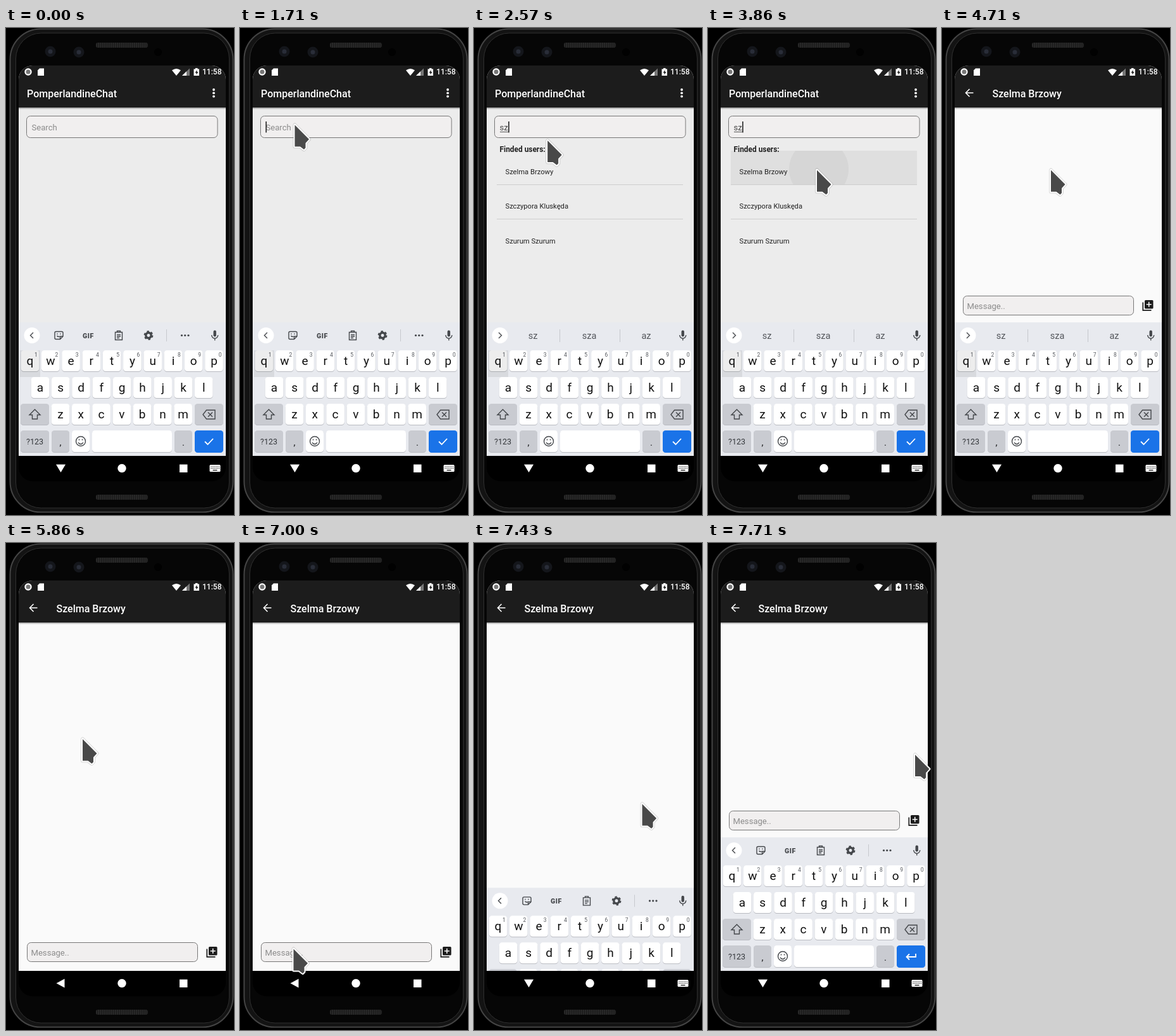
Recreate the animation shown at these times as an HTML page. Size 360 by 766 pixels, loop 8 s.

```html
<!DOCTYPE html>
<html lang="en">
<head>
<meta charset="utf-8">
<title>Chat search</title>
<style>
html, body { margin: 0; height: 100%; overflow: hidden; background: #000; }
svg { display: block; width: 100vw; height: 100vh; font-family: Roboto, sans-serif; }
.line { fill: none; stroke: #44474b; stroke-width: 1.4; }
.title { font-size: 16px; font-weight: 500; fill: #fff; }
.input { font-size: 13.1px; fill: #8b8b8b; }
.box { fill: #f1efef; stroke: #777; }
.row { font-size: 11.2px; fill: #222; }
.mid { text-anchor: middle; }
</style>
</head>
<body>
<svg viewBox="0 0 360 766">
  <defs>
    <clipPath id="screen"><path d="M20 673V81a22 22 0 0 1 22-22H325a22 22 0 0 1 22 22V673Z"/></clipPath>
    <clipPath id="firstRow"><path d="M36 193H330V247H36Z"/></clipPath>
    <linearGradient id="shade" x2="0" y2="1">
      <stop stop-color="#000" stop-opacity=".4"/><stop offset="1" stop-color="#000" stop-opacity="0"/>
    </linearGradient>
    <pattern id="mesh" width="3" height="7" patternUnits="userSpaceOnUse">
      <path fill="#292929" d="M0 0h3v7H0z"/><path fill="#161616" d="M0 0h1v7H0z"/>
    </pattern>
  </defs>

  <g id="phone">
    <rect x="6.5" y="1.5" width="352" height="760" rx="48" fill="#131313" stroke="#444" stroke-width="2"/>
    <rect x="15.5" y="8" width="337" height="747" rx="40" fill="#060606" stroke="#303030"/>
    <rect x="142" y="23" width="82" height="8" rx="3" fill="url(#mesh)"/>
    <rect x="142" y="734" width="82" height="8" rx="3" fill="url(#mesh)"/>
    <g fill="#14161b"><circle cx="70" cy="37" r="8.5"/><circle cx="115" cy="38" r="8.5"/></g>
    <g fill="#292d38"><circle cx="70" cy="37" r="3.5"/><circle cx="115" cy="38" r="3.5"/></g>
    <circle cx="240" cy="38" r="6" fill="#010101"/>
  </g>

  <g clip-path="url(#screen)">
    <rect x="20" y="59" width="327" height="614" fill="#ececec"/>
    <rect x="20" y="59" width="327" height="66" fill="#1c1c1c"/>
    <rect x="20" y="125" width="327" height="3" fill="url(#shade)"/>
    <text class="title" x="33" y="108.5">PomperlandineChat</text>
    <g fill="#fff"><circle cx="328" cy="97" r="1.9"/><circle cx="328" cy="102.3" r="1.9"/><circle cx="328" cy="107.6" r="1.9"/></g>
    <rect class="box" x="32.5" y="138.5" width="301.5" height="34" rx="6"/>
    <text class="input" id="query" x="40.5" y="160.5"></text>
    <path id="underline" stroke="#555"/>
    <path id="caret" d="M0 147V164.5" stroke="#222" stroke-width="1.6"/>

    <g id="results">
      <g id="press" clip-path="url(#firstRow)">
        <path fill="#dfdfdf" d="M36 193H330V247H36Z"/>
        <circle id="ripple" cx="175" cy="222" fill="#d6d6d6"/>
      </g>
      <text x="40.5" y="195" font-size="11.9" font-weight="700" fill="#222">Finded users:</text>
      <text class="row" x="49.5" y="230">Szelma Brzowy</text>
      <text class="row" x="49.5" y="284">Szczypora Kluskęda</text>
      <text class="row" x="49.5" y="338.5">Szurum Szurum</text>
      <path d="M36 246.5H330M36 300.5H330" stroke="#cecece"/>
    </g>

    <g id="chat">
      <rect x="20" y="82" width="327" height="600" fill="#fafafa"/>
      <rect x="20" y="82" width="327" height="43" fill="#1c1c1c"/>
      <rect x="20" y="125" width="327" height="3" fill="url(#shade)"/>
      <path d="M49.5 102H38M43.5 96L37.5 102L43.5 108" fill="none" stroke="#fff" stroke-width="1.6"/>
      <text class="title" x="79.5" y="108.5">Szelma Brzowy</text>
      <g id="message">
        <rect class="box" x="33.5" y="421.5" width="269" height="30" rx="6"/>
        <text class="input" x="39.5" y="441.5">Message..</text>
        <path id="messageCaret" d="M40.5 427.5V446.5" stroke="#222" stroke-width="1.6"/>
        <rect x="320" y="428" width="13.5" height="13.5" rx="1.5" fill="#1c1c1c"/>
        <path d="M326.700 430.700V438.700M322.700 434.700H330.700" stroke="#fafafa" stroke-width="1.6"/>
        <path d="M317.300 431.500V444.200H330.500" fill="none" stroke="#1c1c1c" stroke-width="1.7"/>
      </g>
    </g>

    <g id="keyboard">
      <rect x="20" y="463" width="327" height="210" fill="#e8eaef"/>
      <circle cx="41" cy="483.5" r="12.5" fill="#fff"/>
      <path class="line" d="M324.700 483a5 5.200 0 0 0 10 0M329.700 488V491.500"/>
      <rect x="327.500" y="475.500" width="4.400" height="10" rx="2.200" fill="#44474b"/>
      <g id="tools">
        <g class="line">
          <path d="M43 479L38.5 483.5L43 488"/>
          <path d="M79 477.5H88a2 2 0 0 1 2 2V485L85.5 489.5H79a2 2 0 0 1-2-2V479.5a2 2 0 0 1 2-2ZM90 485H85.5V489.5M80.5 484q2 2.5 4 1M81 480.5v1.5M86 480.5v1.5"/>
          <path d="M172.5 478.5H183.5V490.5H172.5ZM175.5 478V476.5H180.5V478M175 482.5H181M175 485H181M175 487.5H179"/>
          <circle cx="225" cy="483.5" r="4.2" stroke-width="3.4"/>
          <circle cx="225" cy="483.5" r="6.4" stroke-width="2" stroke-dasharray="3.35"/>
        </g>
        <text class="mid" x="130" y="487.5" font-size="10.5" font-weight="900" letter-spacing=".6" fill="#44474b">GIF</text>
        <path d="M253.5 474V493" stroke="#c6c8cd"/>
        <g fill="#44474b"><circle cx="277.5" cy="483.5" r="1.6"/><circle cx="282.7" cy="483.5" r="1.6"/><circle cx="288" cy="483.5" r="1.6"/></g>
      </g>
      <g id="words">
        <path class="line" d="M39 479L43.5 483.5L39 488"/>
        <path d="M135.5 474V494M230.5 474V494" stroke="#c6c8cd"/>
        <g class="mid" font-size="14.5" fill="#54575c">
          <text x="93" y="489">sz</text><text x="182" y="489">sza</text><text x="272" y="489">az</text>
        </g>
      </g>
      <g id="keys"></g>
      <path id="held" d="M22 507H54V549H22Z" opacity=".07"/>
      <g class="line">
        <path d="M45.5 600L54 608.5H49.5V615H41.5V608.5H37Z"/>
        <path d="M316.5 601H330V615H316.5L311 608ZM319 604.5L326 611.5M326 604.5L319 611.5"/>
        <circle cx="118" cy="650" r="7.5"/>
        <path d="M114 652q4 5 8 0M115.5 646.5v2M120.5 646.5v2"/>
      </g>
      <g fill="none" stroke="#fff" stroke-width="1.8">
        <path id="check" d="M314 650.5L318.5 655L327 646"/>
        <path id="enter" d="M328 646V651H314M318 646.5L313.5 651L318 655.5"/>
      </g>
    </g>

    <g fill="#fff">
      <circle cx="35" cy="69" r="5.7"/><circle cx="35" cy="69" r="3.5" fill="#777"/>
      <path d="M53 63.5H60V75H50V66.5Z"/>
      <path d="M262 66.5q7-5 14 0L269 75Z"/>
      <path d="M290 63.5V75H278Z" fill="#777"/><path d="M285 68.3V75H278Z"/>
      <path d="M296.5 64.5H299V63H302.5V64.5H305V75H296.5Z"/>
      <path d="M301.5 66L298.5 70.5H300.5V73.5L303.5 69H301.5Z" fill="#1c1c1c"/>
      <text x="310" y="73.3" font-size="12" font-weight="500">11:58</text>
    </g>
  </g>

  <path d="M20 673H347V691a22 22 0 0 1-22 22H42a22 22 0 0 1-22-22Z"/>
  <g fill="#fff">
    <path id="back"/>
    <circle cx="183" cy="692.5" r="6.7"/>
    <rect x="274" y="686.5" width="12.5" height="12.5"/>
    <g id="switcher">
      <rect x="321.5" y="687" width="17" height="11" rx="1.5"/>
      <path d="M323.5 690H337M323.5 692.5H337" stroke="#000" stroke-width="1.2" stroke-dasharray="1.3 1.2"/>
      <path d="M326.5 695.5H333.5" stroke="#000" stroke-width="1.2"/>
    </g>
  </g>

  <g id="pointer">
    <path d="M0 0V34H8.5L14.5 38.5L17 36V28.5L22.5 22.5Z" fill="none" stroke="#000" stroke-opacity=".13" stroke-width="6" stroke-linejoin="round"/>
    <path d="M0 0V34H8.5L14.5 38.5L17 36V28.5L22.5 22.5Z" fill="#494949" stroke="#fff" stroke-width="4" stroke-linejoin="round" paint-order="stroke"/>
  </g>
</svg>

<script>
const $ = id => document.getElementById(id);
const LOOP = 8000, RATE = 7;
const GREY = '#c9cbd1', BLUE = '#1a73e8';

// Keyboard
const cap = (x, y, w, fill = '#fff', h = 33, edge = '#b9bbc1') =>
  `<rect x="${x}" y="${y + 1}" width="${w}" height="${h}" rx="4.5" fill="${edge}"/>
   <rect x="${x}" y="${y}" width="${w}" height="${h}" rx="4.5" fill="${fill}"/>`;
const label = (text, x, y, size, fill = '#1b1c1e') =>
  `<text class="mid" x="${x}" y="${y}" font-size="${size}" fill="${fill}">${text}</text>`;

let keys = '';
[['qwertyuiop', 38, 507], ['asdfghjkl', 54, 549], ['zxcvbnm', 86, 591]].forEach(([letters, x0, y], row) =>
  [...letters].forEach((letter, i) => {
    const x = x0 + i * 32.28;
    keys += cap(x - 14.3, y, 28.6) + label(letter, x, y + 22.5, 19, '#111');
    if (!row) keys += label((i + 1) % 10, x + 9.5, y + 9.5, 8.5, '#55585d');
  }));
keys += cap(23, 591, 45, GREY) + cap(298, 591, 45, GREY);
for (const [x, w, fill] of [[23, 45, GREY], [72, 28, GREY], [104, 28], [136, 126], [266, 28, GREY]])
  keys += cap(x, 633, w, fill, 34);
keys += cap(298, 633, 45, BLUE, 34, BLUE);
keys += label('?123', 45.5, 655, 12.5, '#33363a') + label(',', 86, 657, 15) + label('.', 280, 657, 15);
$('keys').innerHTML = keys;

// Pointer stops: time, x, y
const stops = [
  [140, 302, 612], [570, 190, 330], [860, 100, 112], [1000, 86.5, 152.5],
  [2290, 86.5, 152.5], [3000, 172, 223.5], [5290, 172, 223.5], [5860, 121, 308.5],
  [6140, 37, 612], [6430, 310, 168], [6860, 90, 620], [7000, 84.5, 638.5],
  [7140, 84.5, 638.5], [7570, 327, 333]
];
const clamp = v => Math.max(0, Math.min(1, v));
const progress = (t, from, to) => clamp((t - from) / (to - from));

function pointerAt(t) {
  const next = stops.findIndex(s => s[0] > t);
  if (next < 0) return stops.at(-1).slice(1);
  const a = stops[Math.max(0, next - 1)], b = stops[next];
  const p = progress(t, a[0], b[0]), e = p * p * (3 - 2 * p);
  return [a[1] + (b[1] - a[1]) * e, a[2] + (b[2] - a[2]) * e];
}

const show = (id, on) => $(id).style.display = on ? '' : 'none';
const move = (id, x, y) => $(id).setAttribute('transform', `translate(${x} ${y})`);
const within = (t, from, to) => t >= from && t < to;

function draw(t) {
  // Search
  const typed = t < 1850 ? '' : t < 2135 ? 's' : 'sz';
  $('query').textContent = typed || 'Search';
  $('query').style.fill = typed ? '#444' : '';
  show('underline', typed);
  $('underline').setAttribute('d', `M41 163.5h${typed.length * 6.6}`);
  const blink = within(t, 1425, 1710) || within(t, 2710, 2995) || within(t, 3565, 3850);
  show('caret', t >= 1135 && !blink);
  move('caret', 41.3 + typed.length * 6.8, 0);
  show('results', t >= 2280);
  show('press', t >= 3850);
  $('ripple').setAttribute('r', 47 + 200 * progress(t, 3860, 4290));

  // Chat
  const enter = progress(t, 3860, 4290);
  show('chat', enter > 0);
  $('chat').style.opacity = enter;
  move('chat', 0, 45 * (1 - enter) ** 2);
  move('message', 0, within(t, 4850, 7565) ? 207 : 0);
  show('messageCaret', within(t, 7135, 7705));

  // Keyboard
  const later = t > 6000;
  const drop = later ? (1 - progress(t, 7250, 7710)) ** 2 : progress(t, 4820, 5140) ** 2;
  move('keyboard', 0, 212 * drop);
  show('tools', later || t < 1850);
  show('words', !later && t >= 1850);
  show('held', !later);
  show('check', !later);
  show('enter', later);
  const open = !within(t, 4850, 7250);
  $('back').setAttribute('d', open ? 'M79 686.5H94L86.5 699Z' : 'M92.5 685.5V699.5L79.5 692.5Z');
  show('switcher', open || t < 4990);

  show('pointer', t >= 140);
  move('pointer', ...pointerAt(t));
}

function tick() {
  const t = performance.now() % LOOP;
  draw(Math.floor((t + 5) * RATE / 1000) * 1000 / RATE % LOOP);
  requestAnimationFrame(tick);
}
tick();
</script>
</body>
</html>
```
